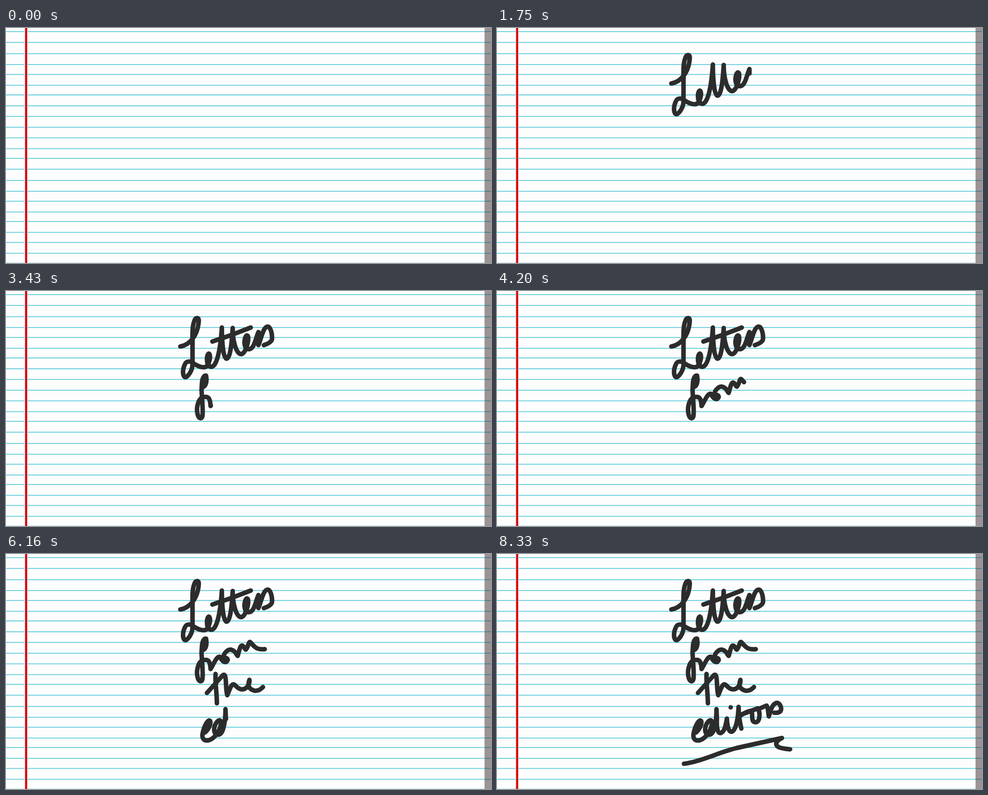
An HTML page that plays this animation: 1074x521 px, repeating every 8.53 s.

```html
<!DOCTYPE html>
<html lang="en">
<head>
<meta charset="utf-8">
<title>Letters from the editors</title>
<style>
  html, body { margin: 0; width: 100%; height: 100%; overflow: hidden; background: #fdfdfd; }
  svg { display: block; width: 100%; height: 100%; }
  #rules path { stroke: #6bd0de; stroke-width: 2.2; }
  #ink path { fill: none; stroke: #2c2c2c; stroke-width: 10; stroke-linecap: round; stroke-linejoin: round; }
</style>
</head>
<body>
<svg viewBox="0 0 1074 521" preserveAspectRatio="none">
  <rect width="1074" height="521" fill="#fdfdfd"/>
  <g id="rules"></g>
  <rect x="41" width="7" height="521" fill="#fbeeee"/>
  <rect x="42.2" width="4.7" height="521" fill="#d30b12"/>
  <rect x="1059.7" width="14.3" height="521" fill="#9c9396"/>
  <g id="edge" stroke="#4b7f89" stroke-width="2"></g>
  <g id="ink"></g>
</svg>
<script>
const LOOP = 8530, STEP = 70, LAST = 8330;
const SVG = "http://www.w3.org/2000/svg";

function addPath(parent, d) {
  const el = document.createElementNS(SVG, "path");
  el.setAttribute("d", d);
  return parent.appendChild(el);
}

const rules = document.getElementById("rules");
const edge = document.getElementById("edge");
const ink = document.getElementById("ink");

for (const y of [8, 32, 57, 81, 103, 127, 148.3, 172.3, 196, 220, 243.5,
                 267.5, 289, 313, 338, 362, 384, 408, 429, 453, 475.5, 499.5]) {
  addPath(rules, `M0 ${y}H1060`);
  addPath(edge, `M1060 ${y}H1074`);
}
addPath(rules, "M0 521.6H1060");

// Each passage is written at an even pace; pen lifts count as travel.
const passages = [
  { from: 0, to: 980, strokes: [
    "M386 123C405 120 425 101 427 65C427 59 421 58 418 64C412 77 413 95 413 110V162C413 178 402 190 398 191C391 192 390 175 396 163C399 154 409 155 416 161C428 169 441 172 446 165C451 157 453 147 451 141C450 137 446 138 445 149C445 158 446 163 451 167"
  ]},
  { from: 980, to: 2660, strokes: [
    "M451 167C467 175 475 127 478 81C478 104 480 148 488 150C497 150 500 114 502 82C502 112 510 140 521 140C531 138 538 110 536 101C534 95 529 100 528 113C528 124 532 129 538 129C550 128 552 107 559 91L559 120C565 107 569 80 579 79C586 78 590 96 589 107C588 113 580 117 571 120",
    "M457 112L495 99L542 81",
    "M436 213C444 210 445 198 443 188"
  ]},
  { from: 2660, to: 4200, strokes: [
    "M443 188C440 186 435 191 434 203L433 219C434 240 437 266 435 277C434 284 428 284 425 276C420 261 425 242 434 236C450 231 452 240 453 255C459 246 466 226 474 228C477 236 483 241 488 239C494 235 490 229 483 231C479 223 490 211 498 212C508 214 509 222 513 226C516 217 518 204 522 203C527 202 528 211 531 212C536 208 537 195 540 195C543 196 544 200 547 202"
  ]},
  { from: 4200, to: 6160, strokes: [
    "M547 202C554 210 560 212 573 211",
    "M464 266C463 288 467 308 467 331",
    "M445 308L480 269C490 261 485 298 490 313C494 305 498 288 504 289C509 290 511 298 521 300C533 301 540 289 539 279C534 293 539 300 550 303C559 304 564 300 569 295",
    "M440 396C448 390 455 376 452 370C447 365 438 383 435 400C434 411 440 415 449 413C464 409 477 385 476 372C473 362 460 377 461 391C462 403 474 404 479 393C484 380 486 360 486 344L487 366"
  ]},
  { from: 6160, to: 7700, strokes: [
    "M487 366C486 386 489 398 495 397C504 395 507 378 509 365C510 385 514 395 520 394C530 390 534 361 535 339C535 359 538 374 541 387",
    "M539 358C547 353 554 349 561 348C570 350 559 373 573 373C583 373 583 350 578 344L597 336C601 341 600 351 602 360L607 344"
  ]},
  { from: 7700, to: 7980, strokes: [
    "M607 344C611 334 616 330 621 330C628 332 631 343 628 348C625 352 620 352 614 352",
    "M517.5 340h.01",
    "M541 356L578 342"
  ]},
  { from: 8050, to: LAST, strokes: [
    "M414 465C453 460 490 440 531 430L631 408C617 415 615 422 623 428C629 431 639 432 649 433"
  ]}
];

for (const p of passages) {
  let pos = 0, tip = null;
  p.strokes = p.strokes.map(d => {
    const el = addPath(ink, d);
    const len = el.getTotalLength();
    const head = el.getPointAtLength(0);
    if (tip) pos += Math.hypot(head.x - tip.x, head.y - tip.y);
    const stroke = { el, len, start: pos };
    pos += len;
    tip = el.getPointAtLength(len);
    return stroke;
  });
  p.travel = pos;
}

function draw(ms) {
  const t = Math.min(Math.floor((ms % LOOP) / STEP) * STEP, LAST);
  for (const { from, to, strokes, travel } of passages) {
    const pen = Math.min(1, (t - from) / (to - from)) * travel;
    for (const { el, len, start } of strokes) {
      const shown = pen - start;
      el.style.visibility = shown > 0 ? "visible" : "hidden";
      el.style.strokeDasharray = shown < len ? `${Math.max(0, shown)} 9999` : "none";
    }
  }
}

const began = performance.now();
function tick() {
  draw(performance.now() - began);
  requestAnimationFrame(tick);
}
tick();
</script>
</body>
</html>
```
